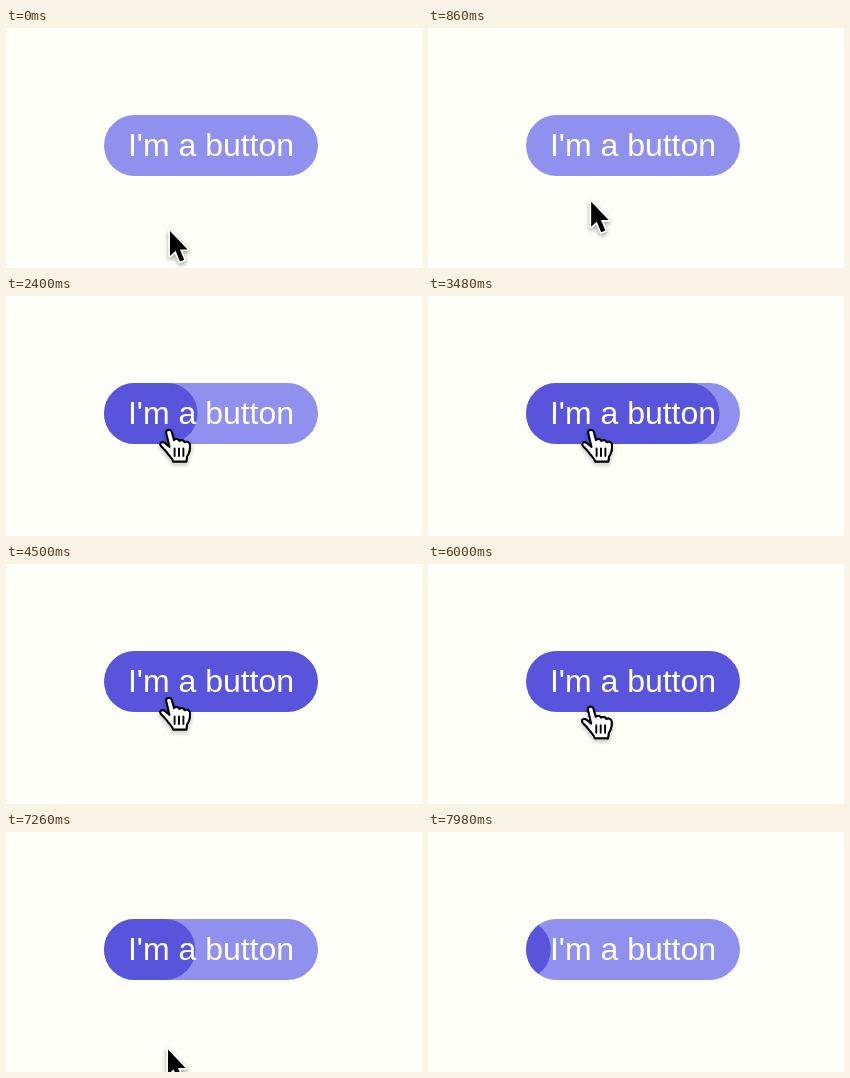
An HTML page with a canvas that plays this animation: 416x240 px, repeating every 8 s.

```html
<!DOCTYPE html>
<html lang="en">
<head>
<meta charset="utf-8">
<title>Button fill on hover</title>
<style>
  html, body { margin: 0; width: 100%; height: 100%; overflow: hidden; background: #fffffa; }
  canvas { display: block; }
</style>
</head>
<body>
<canvas id="stage" width="416" height="240"></canvas>
<script>
const ctx = document.getElementById('stage').getContext('2d');
const LOOP = 8000;
const BOX = { x: 98, y: 87, w: 214, h: 61 };
const LIGHT = '#9090ef', DARK = '#5855dc', PAPER = '#fffffa';
const ENTER = 1810, LEAVE = 6755, FADE = 3000;

// Pointer tip over scene time: [ms, x, y]
const track = [
  [0, 164, 203], [850, 163.3, 177], [1700, 162, 149], [1850, 162, 144],
  [2350, 163, 134], [5900, 163, 134], [6700, 162.5, 148],
  [7100, 162, 168], [7550, 162, 203], [8100, 162, 243]
];

const arrow = new Path2D('M0 0V25L5.6 19.8L10 30.5L14.2 28.8L9.9 18.4H17.5Z');
const hand = new Path2D(
  'M-2.7 3C-3.2 -.4 1.6 -1.4 2.8 2.2L5 10.2C6.5 8.6 9.4 8.8 10.3 11' +
  'C12.2 9.6 14.6 10 15.6 12.3C18 11 21 12.4 21 15.5C21.2 20 20.3 23 18 26.5' +
  'L17.3 31.5H4.2C3.6 28.6 1 26.6 -1.2 23.6C-3 21 -5 19 -7.8 16.2' +
  'C-10.2 13.4 -7 10.8 -4 13.2L.6 17Z');
const creases = new Path2D('M5.6 18.5V26M10 18.5V26M14.4 18.5V26');

// CSS "ease", solved by bisection
function ease(x) {
  if (x <= 0) return 0;
  if (x >= 1) return 1;
  let lo = 0, hi = 1;
  for (let i = 0; i < 24; i++) {
    const s = (lo + hi) / 2;
    if (0.75 * s * (1 - s) + s ** 3 < x) lo = s; else hi = s;
  }
  const r = 1 - lo;
  return 0.3 * lo * r * r + 3 * lo * lo * r + lo ** 3;
}

// Uneven 20/100/20 ms holds, each advancing the scene by 50 ms
function sceneTime(t) {
  const r = t % 140;
  return (Math.floor(t / 140) * 3 + (r < 20 ? 0 : r < 120 ? 1 : 2)) * 50;
}

function pointerAt(t) {
  let i = 1;
  while (i < track.length - 1 && track[i][0] < t) i++;
  const [t0, x0, y0] = track[i - 1], [t1, x1, y1] = track[i];
  const k = Math.min(1, (t - t0) / (t1 - t0));
  return [x0 + (x1 - x0) * k, y0 + (y1 - y0) * k];
}

function pill(x) {
  ctx.beginPath();
  ctx.roundRect(x, BOX.y, BOX.w, BOX.h, BOX.h / 2);
}

function drawButton(fill) {
  ctx.save();
  pill(BOX.x);
  ctx.fillStyle = LIGHT;
  ctx.fill();
  if (fill > 0) {
    ctx.clip();
    pill(BOX.x - BOX.w * (1 - fill));
    ctx.fillStyle = DARK;
    ctx.fill();
  }
  ctx.restore();
  ctx.font = '32px "Liberation Sans", Arial, sans-serif';
  ctx.textAlign = 'center';
  ctx.fillStyle = '#fff';
  ctx.fillText("I'm a button", BOX.x + BOX.w / 2, 128);
}

function drawPointer(x, y, hover) {
  const shape = hover ? hand : arrow;
  ctx.save();
  ctx.translate(x, y);
  ctx.lineJoin = 'round';
  ctx.lineCap = 'round';
  ctx.save();
  ctx.shadowColor = 'rgba(0,0,0,.4)';
  ctx.shadowBlur = 4;
  ctx.shadowOffsetY = 2;
  ctx.lineWidth = hover ? 2 : 3.4;
  ctx.strokeStyle = hover ? '#000' : '#fff';
  ctx.stroke(shape);
  ctx.restore();
  ctx.fillStyle = hover ? '#fff' : '#000';
  ctx.fill(shape);
  if (hover) {
    ctx.lineWidth = 1.9;
    ctx.stroke(shape);
    ctx.stroke(creases);
  }
  ctx.restore();
}

function draw(now) {
  const t = sceneTime(now % LOOP);
  const fill = t < LEAVE ? ease((t - ENTER) / FADE) : 1 - ease((t - LEAVE) / FADE);
  ctx.fillStyle = PAPER;
  ctx.fillRect(0, 0, 416, 240);
  drawButton(fill);
  const [x, y] = pointerAt(t);
  drawPointer(x, y, t >= ENTER - 10 && t < LEAVE);
}

const start = performance.now();
function tick() {
  draw(performance.now() - start);
  requestAnimationFrame(tick);
}
tick();
</script>
</body>
</html>
```
